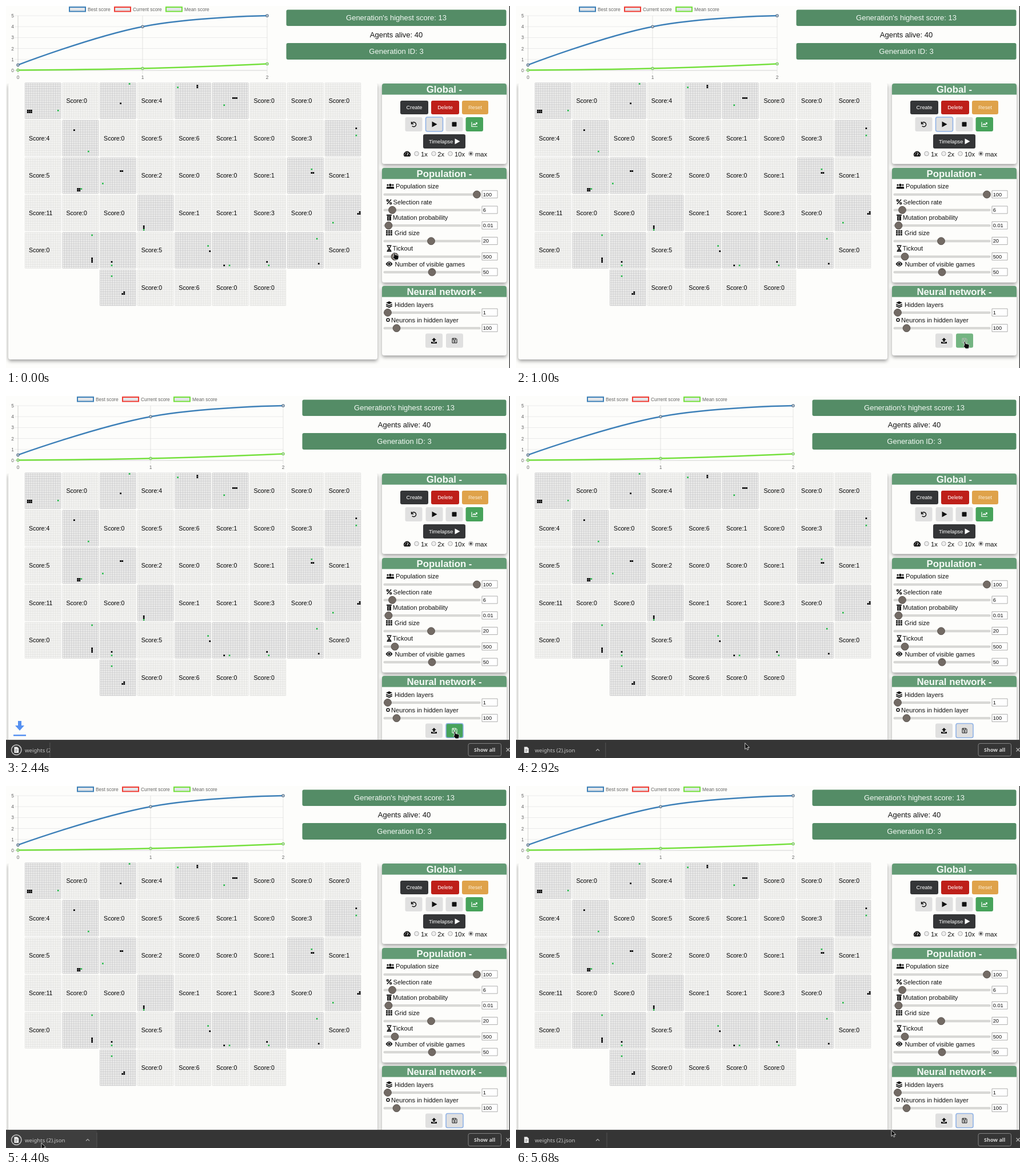
Recreate the animation shown at these times as an HTML page with a canvas. Size 882 by 635 pixels, loop 5.72 s.

```html
<!DOCTYPE html>
<html lang="en">
<head>
<meta charset="utf-8">
<title>Neuroevolution dashboard</title>
<style>
html, body { margin: 0; width: 100%; height: 100%; overflow: hidden; background: #fdfdfb; }
canvas { display: block; }
</style>
</head>
<body>
<canvas id="stage" width="882" height="635"></canvas>
<script>
const g = document.getElementById('stage').getContext('2d');
const LOOP = 5720, INK = '#111', GREY = [224, 224, 224], GREEN = [71, 163, 91];
const SANS = '"Liberation Sans", Arial, sans-serif', UI = '"Noto Sans", "Open Sans", sans-serif';
const clamp = v => Math.max(0, Math.min(1, v));
const ramp = (t, start, length) => clamp((t - start) / length);
const mix = (a, b, k) => `rgb(${a.map((v, i) => Math.round(v + (b[i] - v) * k))})`;

function text(str, x, y, size, color = INK, align = 'left', weight = 400, family = SANS) {
  g.font = `${weight} ${size}px ${family}`;
  g.textAlign = align;
  g.fillStyle = color;
  g.fillText(str, x, y + size * 0.36);
}
function rect(x, y, w, h, fill) {
  g.fillStyle = fill;
  g.fillRect(x, y, w, h);
}
function box(x, y, w, h, r, fill, stroke, width = 1) {
  g.beginPath();
  g.roundRect(x, y, w, h, r);
  if (fill) { g.fillStyle = fill; g.fill(); }
  if (stroke) { g.strokeStyle = stroke; g.lineWidth = width; g.stroke(); }
}
function disc(x, y, r, fill, stroke, width = 1) {
  box(x - r, y - r, 2 * r, 2 * r, r, fill, stroke, width);
}
function shape(d, x, y, fill, stroke, width = 1) {
  g.save();
  g.translate(x, y);
  const p = new Path2D(d);
  if (fill) { g.fillStyle = fill; g.fill(p); }
  if (stroke) { g.strokeStyle = stroke; g.lineWidth = width; g.stroke(p); }
  g.restore();
}
function card(x, y, w, h, r = 4) {
  g.save();
  g.shadowColor = 'rgba(0,0,0,.38)';
  g.shadowBlur = 6;
  g.shadowOffsetY = 3;
  box(x, y, w, h, r, '#fdfdfb');
  g.restore();
}

// Icons are centred on their position.
const icons = {
  users(x, y) {
    for (const [dx, r] of [[-4.5, 1.6], [4.5, 1.6], [0, 2.3]]) {
      disc(x + dx, y - 2.3, r, INK);
      box(x + dx - r * 1.35, y + 0.5, r * 2.7, 3.6, [2, 2, 0, 0], INK);
    }
  },
  percent(x, y) {
    shape('M3.5-4L-3.5 4', x, y, null, INK, 1.6);
    disc(x - 2.7, y - 2.6, 1.5, null, INK, 1.4);
    disc(x + 2.7, y + 2.6, 1.5, null, INK, 1.4);
  },
  vial(x, y) {
    rect(x - 4.5, y - 5, 9, 2, INK);
    rect(x - 3.5, y - 2.4, 7, 8, INK);
    for (const dy of [-0.8, 1.4, 3.6]) rect(x - 2, y + dy, 3, 0.8, '#eee');
  },
  grid(x, y) {
    for (let i = 0; i < 9; i++) rect(x - 5.5 + i % 3 * 3.9, y - 4.7 + (i / 3 | 0) * 3.3, 3.1, 2.5, INK);
  },
  hourglass(x, y) {
    shape('M-4-5H4M-4 5H4M-2.8-5C-2.8-1 2.8 1 2.8 5M2.8-5C2.8-1-2.8 1-2.8 5', x, y, null, INK, 1.4);
    shape('M-2 4L0 1.5L2 4Z', x, y, INK);
  },
  eye(x, y) {
    shape('M-6 0Q0-8.5 6 0Q0 8.5-6 0Z', x, y, INK);
    disc(x, y, 2.6, null, '#fff', 1);
  },
  layers(x, y) {
    shape('M0-5.5L5.5-3L0-.5L-5.5-3Z', x, y, INK);
    shape('M-5.3-.2L0 2.2L5.3-.2M-5.3 2.6L0 5L5.3 2.6', x, y, null, INK, 1.6);
  },
  ring(x, y) { disc(x, y, 2.5, null, INK, 1.5); },
  undo(x, y) { shape('M-4-4.5V-.8H-.3M-3.6-1.2A4 4 0 1 1-2.8 3', x, y, null, INK, 1.4); },
  play(x, y, c = INK) { shape('M-4-5L5 0L-4 5Z', x, y, c); },
  stop(x, y) { box(x - 4, y - 4, 8, 8, 1, INK); },
  chart(x, y) { shape('M-5-4V4H5M-3 1.5L-.8-1L1 1L4-2.5M1.8-2.7H4.2V-.3', x, y, null, '#fff', 1.2); },
  upload(x, y) {
    shape('M0-5L4-1H1.5V2H-1.5V-1H-4Z', x, y, INK);
    shape('M-5 2H-2.5V3.2H2.5V2H5V5H-5Z', x, y, INK);
  },
  save(x, y, c) {
    shape('M-4-4H2.5L4-2.5V4H-4ZM-2.2-4V-1.2H1.8V-4', x, y, null, c, 1);
    disc(x, y + 1.6, 1.2, null, c, 0.9);
  },
  gauge(x, y) {
    shape('M-5 4A6 6 0 1 1 5 4Z', x, y, INK);
    shape('M-.2 2L2-2.6', x, y, null, '#fff', 1.2);
    for (const [dx, dy] of [[-4, 1], [-2.7, -2], [0, -3.3], [4, 1]]) disc(x + dx, y + dy, 0.7, '#fff');
  }
};

function drawChart(extra) {
  const left = 21, mid = 239 + extra / 2, right = 457 + extra, bottom = 113, unit = 19.2;
  for (let i = 0; i <= 5; i++) {
    const y = bottom - i * unit;
    rect(15, y - 0.4, right - 15, 0.8, i ? '#e6e6e6' : '#c6c6c6');
    text(i, 14, y, 8.4, '#666', 'right');
  }
  [left, mid, right].forEach((x, i) => {
    rect(x - 0.4, 17, 0.8, 102, i ? '#dcdcdc' : '#c6c6c6');
    text(i, x, 125, 8.4, '#666', 'center');
  });
  const curve = (values, color, dot) => {
    const [a, b, c] = values.map((v, i) => [[left, mid, right][i], bottom - v * unit]);
    const d1 = Math.hypot(b[0] - a[0], b[1] - a[1]), d2 = Math.hypot(c[0] - b[0], c[1] - b[1]);
    const control = k => [b[0] + k * (c[0] - a[0]), b[1] + k * (c[1] - a[1])];
    g.beginPath();
    g.moveTo(...a);
    g.bezierCurveTo(...a, ...control(-0.4 * d1 / (d1 + d2)), ...b);
    g.bezierCurveTo(...control(0.4 * d2 / (d1 + d2)), ...c, ...c);
    g.strokeStyle = color;
    g.lineWidth = 2.5;
    g.stroke();
    for (const p of [a, b, c]) disc(...p, 2.2, '#c9ccd2', dot, 1.1);
  };
  curve([0.03, 0.18, 0.6], '#74e03c', '#74d84a');
  curve([0.5, 4, 5], '#3d80b8', '#50708c');
  [['Best score', 110, '#3d80b8'], ['Current score', 189, '#f03c34'], ['Mean score', 279, '#74e03c']].forEach(([name, x, c]) => {
    x += extra / 2;
    box(x + 1, 2, 28, 7.5, 0, '#e2e5e8', c, 2);
    text(name, x + 33, 5.6, 8.4, '#666');
  });
}

function drawHeader(extra) {
  const x = 490.5 + extra, c = (x + 875.5) / 2;
  box(x, 6.5, 875.5 - x, 28.5, 3, '#548c66');
  box(x, 65, 875.5 - x, 29, 3, '#548c66');
  text("Generation's highest score: 13", c, 20.7, 13, '#f4faf5', 'center');
  text('Agents alive: 40', c, 50, 13, INK, 'center');
  text('Generation ID: 3', c, 79.4, 13, '#f4faf5', 'center');
}

const board = ['. 0 . 4 . . 0 0 0', '4 . 0 5 6 1 0 3 .', '5 . . 2 0 0 1 . 1',
  '11 0 0 . 1 1 3 0 .', '0 . . 5 . . . . 0', '_ _ . 0 6 0 0'].map(r => r.split(' '));
// Running games in reading order: food cell, then snake blocks as x, y, width, height.
const games = [
  [[18, 15], [1, 15, 3, 2]], [[16, 0], [11, 11]], [[1, 2], [12, 1, 1, 2]], [[6, 12], [11, 8, 3]],
  [[14, 17], [6, 5]], [[17, 8], [17, 4]],
  [[10, 17], [8, 17, 2, 2]], [[1, 14], [11, 7, 2]], [[13, 6], [13, 8, 2]],
  [[3, 19], [3, 17, 1, 2]], [[4, 15], [19, 9], [18, 10, 2]],
  [[16, 1], [16, 14, 1, 3]], [[6, 18], [6, 16]], [[18, 7], [19, 10]], [[9, 18], [6, 18]],
  [[10, 18], [9, 16]], [[16, 3], [17, 17]],
  [[6, 3], [13, 12], [12, 13, 2]]
];
const CELL = 3.12;
function drawGames() {
  card(4, 135, 646, 485);
  rect(0, 128, 655, 8, '#fdfdfb');
  let n = 0;
  board.forEach((row, r) => row.forEach((score, c) => {
    if (score === '_') return;
    const x = 33.5 + c * 65.6, y = 135 + r * 65.6, live = score === '.';
    g.fillStyle = live ? '#b9b9bb' : '#d8d8d6';
    for (let i = 0; i <= 20; i++) {
      g.fillRect(x + i * CELL - 0.35, y, 0.75, 62.4);
      g.fillRect(x, y + i * CELL - 0.35, 62.4, 0.75);
    }
    if (!live) return text('Score:' + score, x + 6.4, y + 31.2, 10.55, '#000');
    games[n++].forEach(([bx, by, w = 1, h = 1], part) => {
      for (let i = 0; i < w; i++) for (let j = 0; j < h; j++)
        rect(x + (bx + i) * CELL + 0.2, y + (by + j) * CELL + 0.2, 2.7, 2.7, part ? '#000' : '#2fc653');
    });
  }));
}

function panel(title, y, h) {
  card(658, y, 218, h);
  box(658, y, 218, 19.5, [4, 4, 0, 0], '#639b75');
  text(title, 767, y + 9.6, 16.75, '#f6fbf7', 'center', 700);
}
function button(x, y, w, h, fill, label, color = '#fff') {
  box(x, y, w, h, 3, fill);
  if (label) text(label, x + w / 2, y + h / 2, 9.25, color, 'center');
}
function slider(label, value, icon, y, knob, textX) {
  icons[icon](icon === 'ring' ? 668.5 : icon === 'users' ? 672.5 : 670.5, y);
  text(label, textX, y, 11.15);
  box(661, y + 12.8, 169, 3.2, 1.5, '#d9d9d7', '#c4c4c2', 0.6);
  disc(knob, y + 14.3, 6.4, '#736b65', '#57514c', 1);
  box(833, y + 7.5, 27, 13, 0, '#fff', '#a5a5a5', 0.9);
  text(value, 834.7, y + 14, 9.25);
}

function drawPanels(t) {
  panel('Global -', 136, 141);
  button(690, 166, 49, 24, '#343537', 'Create');
  button(744, 166, 49, 24, '#be1f19', 'Delete');
  button(798, 166, 46, 24, '#dfa24a', 'Reset', '#fbeed8');
  const focusSave = t >= 2040;
  for (const [x, icon] of [[698.5, 'undo'], [734.5, 'play'], [769.5, 'stop']]) {
    box(x, 195, 30, 25, 3, mix(GREY, GREY, 0), icon === 'play' && !focusSave ? '#8fb2e6' : null, 1.6);
    icons[icon](x + 15, 207.5);
  }
  button(804.5, 195, 30.5, 25, mix(GREEN, GREEN, 0));
  icons.chart(820, 207.5);
  button(730, 225, 74, 25, '#343537');
  text('Timelapse', 740, 237.5, 9.25, '#fff');
  icons.play(789.5, 237.5, '#fff');
  icons.gauge(702, 260);
  [['1x', 718.5, 726], ['2x', 748.5, 755.3], ['10x', 777.5, 785], ['max', 813.5, 821]].forEach(([label, x, tx], i) => {
    disc(x, 259, 3.8, '#eee', '#a0a0a0', 0.9);
    if (i === 3) disc(x, 259, 2.2, '#555');
    text(label, tx, 259.6, 11.15);
  });

  panel('Population -', 284, 201);
  [['Population size', 100, 'users', 824, 682], ['Selection rate', 6, 'percent', 676, 677.5],
    ['Mutation probability', 0.01, 'vial', 669.5, 676.7], ['Grid size', 20, 'grid', 744, 680],
    ['Tickout', 500, 'hourglass', 680.5, 676.5], ['Number of visible games', 50, 'eye', 745.5, 680.5]
  ].forEach(([label, value, icon, knob, x], i) => slider(label, value, icon, 316.3 + i * 27.25, knob, x));

  panel('Neural network -', 491, 122);
  slider('Hidden layers', 1, 'layers', 523.5, 668, 680);
  slider('Neurons in hidden layer', 100, 'ring', 550.8, 683.5, 674);
  button(734, 574.5, 30, 25, mix(GREY, GREY, 0));
  icons.upload(749, 587);
  const hover = ramp(t, 860, 200) * (1 - ramp(t, 2660, 200));
  box(770, 574.5, 30, 25, 3, mix(GREY, GREEN, hover), focusSave ? '#8fb2e6' : null, 1.6);
  icons.save(785, 587, mix([17, 17, 17], [255, 255, 255], hover));
}

function drawDownload(t) {
  if (t < 2200) return;
  const fly = ramp(t, 2200, 600);
  if (fly < 1) {
    g.save();
    g.globalAlpha = 1 - 4 * (fly - 0.5) ** 2;
    shape('M-3-14H3V-6H8L0 3L-8-6H-3ZM-11 10H11V12.5H-11Z', 24, 584 + 24 * (fly - 0.4), '#4f8cf0');
    g.restore();
  }
  const top = 635 - 32 * ramp(t, 2200, 120);
  g.save();
  g.translate(0, top - 603);
  rect(0, 603, 882, 32, '#353535');
  rect(0, 603, 882, 1, '#484848');
  const itemW = 159.5 * (1 - (1 - ramp(t, 2215, 800)) ** 2);
  g.save();
  g.beginPath();
  g.rect(0, 603, itemW, 32);
  g.clip();
  if (t > 3200 && t < 5275) rect(0, 604, itemW, 31, '#3e3e3e');
  const done = ramp(t, 2430, 2500);
  if (t > 2400 && done < 1) {
    g.globalAlpha = 0.5 + 0.5 * Math.cos(done * 5 * Math.PI);
    disc(18.2, 620.8, 8.7, null, '#c8c8c8', 1.5);
    g.globalAlpha = 1;
  }
  shape('M-3.8-5.2H1.4L4-2.6V5.2H-3.8Z', 18.2, 620.8, '#eee');
  shape('M-2-.8H2M-2 1H2M-2 2.8H1', 18.2, 620.8, null, '#777', 0.8);
  text('weights (2).json', 33, 621.8, 9.6, '#c6c6c6', 'left', 400, UI);
  shape('M-3 1.5L0-1.5L3 1.5', 143, 621, null, '#aaa', 1.1);
  g.restore();
  rect(itemW - 1, 608, 1, 26, '#555');
  box(809, 609.5, 57.5, 22, 3, null, '#858585', 1);
  text('Show all', 837.7, 620.3, 9, '#d4d4d4', 'center', 600, UI);
  shape('M-3-3L3 3M3-3L-3 3', 878.5, 620.5, null, '#bbb', 1.1);
  g.restore();
  const tip = ramp(t, 3400, 100) * (1 - ramp(t, 3980, 150));
  if (tip > 0) {
    g.globalAlpha = tip;
    box(22.5, 611, 77.5, 18, 2, 'rgba(38,38,38,.96)');
    text('weights (2).json', 29, 619.5, 8.8, '#eee', 'left', 400, UI);
    g.globalAlpha = 1;
  }
}

const path = [[0, 678, 432], [350, 678, 432], [930, 784, 588], [2600, 784, 588], [3240, 21, 629],
  [3700, 21, 629], [4180, 62, 626], [5190, 62, 626], [5680, 657, 603.5], [LOOP, 657, 603.5]];
function drawCursor(t) {
  const i = path.findIndex(p => p[0] > t), [t0, x0, y0] = path[i - 1], [t1, x1, y1] = path[i];
  let k = ramp(t, t0, t1 - t0);
  if (t0 < 5000) k = k * k * (3 - 2 * k);
  const x = x0 + (x1 - x0) * k, y = y0 + (y1 - y0) * k;
  const hand = t < 380 || (t > 860 && t < 2690);
  shape(hand
    ? 'M0 .8Q1.2-.6 2.2.8L3 4.6Q4.2 3.9 5 4.9Q6.3 4.3 7 5.3Q8.6 5 9 6.5V9.5L8 13H2.8L-1 8.5Q-1.6 6.8.8 7.3Z'
    : 'M0 0V11L2.5 8.7L4.2 12.3L6 11.4L4.3 8H7.6Z', x, y, '#0a0a0a', '#f5f5f5', 0.8);
}

function frame(now) {
  const t = now % LOOP, extra = t >= 2320 ? 28 : 0;
  rect(0, 0, 882, 635, '#fdfdfb');
  drawChart(extra);
  drawHeader(extra);
  drawGames();
  drawPanels(t);
  rect(880.7, 0, 1.3, 635, '#333');
  drawDownload(t);
  drawCursor(t);
  requestAnimationFrame(frame);
}
requestAnimationFrame(frame);
</script>
</body>
</html>
```
